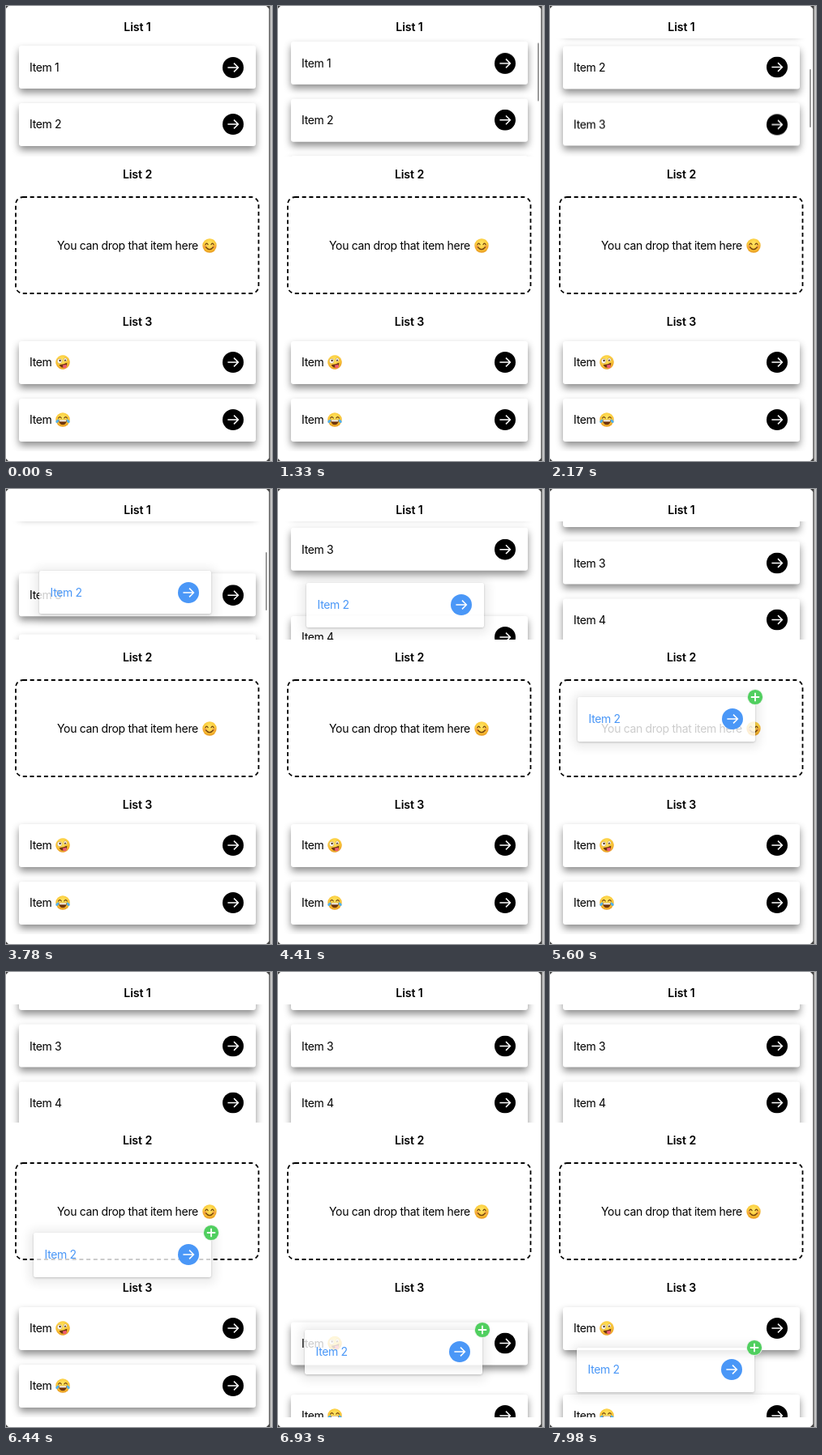
Animation of 328 by 562 pixels, one loop 8 s. Source, as an HTML page:

```html
<!DOCTYPE html>
<html lang="en">
<head>
<meta charset="utf-8">
<title>Drag between lists</title>
<style>
html, body { margin: 0; width: 100%; height: 100%; overflow: hidden; background: #fff; }
#stage {
  position: absolute; left: 0; top: 0; width: 328px; height: 562px; overflow: hidden;
  background: #fff; color: #000;
  font: 14px/20px Inter, Roboto, sans-serif; letter-spacing: -.33px;
}
#stage > *, .card, .badge { position: absolute; }
h2 { left: 0; width: 324px; margin: 0; text-align: center; font: 600 14.2px/20px Inter, Roboto, sans-serif; letter-spacing: -.12px; }

.list { left: 0; width: 324px; overflow: hidden; }
.card {
  left: 15.5px; top: var(--y); width: 292.5px; height: 53px;
  box-sizing: border-box; padding: 0 15.5px 0 13.5px; border-radius: 3px;
  display: flex; align-items: center; white-space: pre;
  background: #fff; box-shadow: 0 5px 10px rgba(0,0,0,.45);
}
.arrow { width: 26px; height: 26px; margin-left: auto; flex: none; }
.face { width: 18px; height: 18px; flex: none; }
.hint { left: 63px; top: 286px; display: flex; align-items: center; white-space: pre; }
.hint .face { position: absolute; left: 179px; top: 1px; }
.list .face { position: absolute; left: 45.5px; top: 17.5px; }

/* every part shares one 8 s clock */
.card, .badge, .thumb { animation: 8s linear infinite; }
.i1 { animation-name: item1; }
.i2 { animation-name: item2; }
.i3 { animation-name: item3; }
.i4 { animation-name: item4; }
.a { animation-name: first; }
.b { animation-name: second; }

@keyframes item1 {
  0%, 15.75% { transform: none; animation-timing-function: cubic-bezier(.3,.1,.3,1); }
  24.5%, 54.25% { transform: translateY(-70.5px); }
  59.5% { transform: translateY(-78.5px); animation-timing-function: ease-out; }
  63.5%, 100% { transform: translateY(-55px); }
}
@keyframes item2 {
  0%, 15.75% { transform: none; visibility: visible; animation-timing-function: cubic-bezier(.3,.1,.3,1); }
  24.5%, 38.5% { transform: translateY(-70.5px); visibility: visible; }
  38.51%, 100% { transform: translateY(-70.5px); visibility: hidden; }
}
@keyframes item3 {
  0%, 15.75% { transform: none; animation-timing-function: cubic-bezier(.3,.1,.3,1); }
  24.5%, 46.3% { transform: translateY(-70.5px); }
  47.25% { transform: translateY(-85.5px); animation-timing-function: ease-out; }
  50.8%, 54.25% { transform: translateY(-141px); }
  59.5% { transform: translateY(-149px); animation-timing-function: ease-out; }
  63.5%, 100% { transform: translateY(-125.5px); }
}
@keyframes item4 {
  0%, 15.75% { transform: none; animation-timing-function: cubic-bezier(.3,.1,.3,1); }
  24.5%, 46.3% { transform: translateY(-70.5px); animation-timing-function: ease-out; }
  50.8%, 55.5% { transform: translateY(-104px); }
  59.5% { transform: translateY(-143px); animation-timing-function: ease-out; }
  63.5%, 100% { transform: translateY(-125.5px); }
}
@keyframes first {
  0%, 82.3% { transform: none; animation-timing-function: ease-out; }
  84.7%, 85.6% { transform: translateY(37px); }
  86.6% { transform: translateY(19px); animation-timing-function: ease-out; }
  89.2%, 100% { transform: none; }
}
@keyframes second {
  0%, 82.3% { transform: none; animation-timing-function: ease-out; }
  84.7%, 100% { transform: translateY(37px); }
}

.thumb { left: 319.5px; top: 43px; width: 2.5px; height: 72px; border-radius: 2px; background: #9c9c9c; animation-name: scroll; }
@keyframes scroll {
  0%, 15.7% { opacity: 0; transform: none; }
  15.75% { opacity: 1; transform: none; animation-timing-function: cubic-bezier(.3,.1,.3,1); }
  24.5%, 48% { opacity: 1; transform: translateY(35px); }
  51.5%, 100% { opacity: 0; transform: translateY(35px); }
}

.drag {
  color: #4a97f7; background: rgba(255,255,255,.8); animation-name: drag;
  box-shadow: 0 1px 3px rgba(0,0,0,.2), 0 2px 12px 6px rgba(0,0,0,.075);
}
@keyframes drag {
  0%, 38.45% { left: 15.5px; top: 49px; width: 292.5px; height: 53px; visibility: hidden; transform: none; }
  38.5% { left: 15.5px; top: 49px; width: 292.5px; height: 53px; visibility: visible; transform: none; animation-timing-function: ease-out; }
  42%, 43% { left: 15.5px; top: 49px; width: 292.5px; height: 53px; transform: scale(1.04); animation-timing-function: ease-in-out; }
  47.25% { left: 41px; top: 101px; width: 212px; height: 53px; transform: none; animation-timing-function: ease-out; }
  51%, 54.25% { left: 35px; top: 112px; width: 219px; height: 54.5px; animation-timing-function: cubic-bezier(.4,0,.7,.8); }
  59.5% { left: 34px; top: 204px; width: 219px; height: 54.5px; animation-timing-function: cubic-bezier(.3,.5,.6,1); }
  63.9% { left: 34px; top: 245px; width: 219px; height: 54.5px; animation-timing-function: ease-out; }
  70%, 77.9% { left: 34px; top: 256.5px; width: 219px; height: 54.5px; animation-timing-function: cubic-bezier(.4,0,.6,.8); }
  82.5% { left: 33.5px; top: 380px; width: 219px; height: 54.5px; animation-timing-function: cubic-bezier(.3,.6,.6,.9); }
  86.6% { left: 33px; top: 442px; width: 219px; height: 54.5px; animation-timing-function: ease-out; }
  95.4%, 100% { left: 33px; top: 463.5px; width: 219px; height: 54.5px; visibility: visible; transform: none; }
}
.badge { right: -10px; top: -10px; width: 20px; height: 20px; animation-name: badge; }
@keyframes badge {
  0%, 64.4% { opacity: 0; transform: scale(.4); }
  66%, 80.6% { opacity: 1; transform: none; }
  81.3%, 82.4% { opacity: 0; transform: scale(.4); }
  83.6%, 100% { opacity: 1; transform: none; }
}
</style>
</head>
<body>
<svg width="0" height="0" style="position:absolute">
  <defs>
    <radialGradient id="gold" cx=".5" cy=".35" r=".65">
      <stop offset="0" stop-color="#ffe765"/><stop offset=".6" stop-color="#fbcb3c"/><stop offset="1" stop-color="#e99a20"/>
    </radialGradient>
    <symbol id="arrow" viewBox="0 0 26 26">
      <circle cx="13" cy="13" r="13" fill="currentColor"/>
      <path d="M6.4 13H19.4M14 7.6 19.4 13 14 18.4" fill="none" stroke="#fff" stroke-width="1.5"/>
    </symbol>
    <symbol id="smile" viewBox="0 0 18 18">
      <circle cx="9" cy="9" r="8.7" fill="url(#gold)"/>
      <g fill="#f08a45" opacity=".6"><circle cx="3.5" cy="10.2" r="2"/><circle cx="14.5" cy="10.2" r="2"/></g>
      <path d="M4 7.6Q5.5 4.8 7 7.6M11 7.6Q12.5 4.8 14 7.6M4.6 11Q9 16.4 13.4 11" fill="none" stroke="#70400f" stroke-width="1.2" stroke-linecap="round"/>
    </symbol>
    <symbol id="zany" viewBox="0 0 18 18">
      <g transform="rotate(-14 9 9)">
        <circle cx="9" cy="9" r="8.7" fill="url(#gold)"/>
        <g fill="#fff" stroke="#a9772c" stroke-width=".4"><circle cx="5.6" cy="6.6" r="2.9"/><circle cx="12.8" cy="6.8" r="2.1"/></g>
        <circle cx="6.2" cy="6.2" r="1.2" fill="#4b2b10"/><circle cx="12.5" cy="7.4" r="1" fill="#4b2b10"/>
        <path d="M4 10.8Q9 12.4 14 10.8 13.2 15.6 9 15.6 4.9 15.6 4 10.8Z" fill="#70360f"/>
        <path d="M8 12.6H12.4V15.4Q10.2 18.2 8 15.4Z" fill="#ef5b72"/>
      </g>
    </symbol>
    <symbol id="joy" viewBox="0 0 18 18">
      <circle cx="9" cy="9" r="8.7" fill="url(#gold)"/>
      <path d="M3.6 7Q5.4 4.2 7.3 7M10.7 7Q12.5 4.2 14.4 7" fill="none" stroke="#70400f" stroke-width="1.2" stroke-linecap="round"/>
      <path d="M4 9.4H14Q13.4 15.2 9 15.2 4.6 15.2 4 9.4Z" fill="#70360f"/>
      <path d="M4.6 9.4H13.4L13 11.2H5Z" fill="#fff"/>
      <path d="M4 8.2Q4.6 12.6 2.2 13 -.4 13 .6 10.6 1.4 9.2 4 8.2ZM14 8.2Q13.4 12.6 15.8 13 18.4 13 17.4 10.6 16.6 9.2 14 8.2Z" fill="#4fb1ee"/>
    </symbol>
  </defs>
</svg>

<div id="stage">
  <div class="list" style="top:40px;height:145.5px">
    <div class="card i1" style="--y:9px">Item 1<svg class="arrow"><use href="#arrow"/></svg></div>
    <div class="card i2" style="--y:79.5px">Item 2<svg class="arrow"><use href="#arrow"/></svg></div>
    <div class="card i3" style="--y:150px">Item 3<svg class="arrow"><use href="#arrow"/></svg></div>
    <div class="card i4" style="--y:220.5px">Item 4<svg class="arrow"><use href="#arrow"/></svg></div>
  </div>

  <svg style="left:0;top:230px" width="324" height="130">
    <rect x="12" y="6" width="299.5" height="119" rx="9" fill="none" stroke="#000" stroke-width="1.8" stroke-dasharray="5 3.7"/>
  </svg>
  <div class="hint">You can drop that item here<svg class="face"><use href="#smile"/></svg></div>

  <div class="list" style="top:404px;height:146px">
    <div class="card a" style="--y:9.5px">Item <svg class="face"><use href="#zany"/></svg><svg class="arrow"><use href="#arrow"/></svg></div>
    <div class="card b" style="--y:80.5px">Item <svg class="face"><use href="#joy"/></svg><svg class="arrow"><use href="#arrow"/></svg></div>
  </div>

  <h2 style="top:15.5px">List 1</h2>
  <h2 style="top:198px">List 2</h2>
  <h2 style="top:380px">List 3</h2>

  <div class="thumb"></div>
  <div class="card drag">Item 2<svg class="arrow"><use href="#arrow"/></svg>
    <svg class="badge" viewBox="0 0 20 20">
      <circle cx="10" cy="10" r="10" fill="#e4efe4"/><circle cx="10" cy="10" r="9.1" fill="#50cf5f"/>
      <path d="M4.8 10H15.2M10 4.8V15.2" stroke="#fff" stroke-width="1.8"/>
    </svg>
  </div>

  <svg style="left:0;top:0" width="328" height="562">
    <path d="M326.8 0V562" stroke="#c4c4c4" stroke-width="2.4"/>
    <path d="M325 0V562" stroke="#4a4a4a" stroke-width="1.4"/>
    <path d="M0 0H3L0 3ZM0 562H3L0 559ZM325 0H321L325 4ZM325 562H321L325 558Z" fill="#444"/>
  </svg>
</div>
</body>
</html>
```
